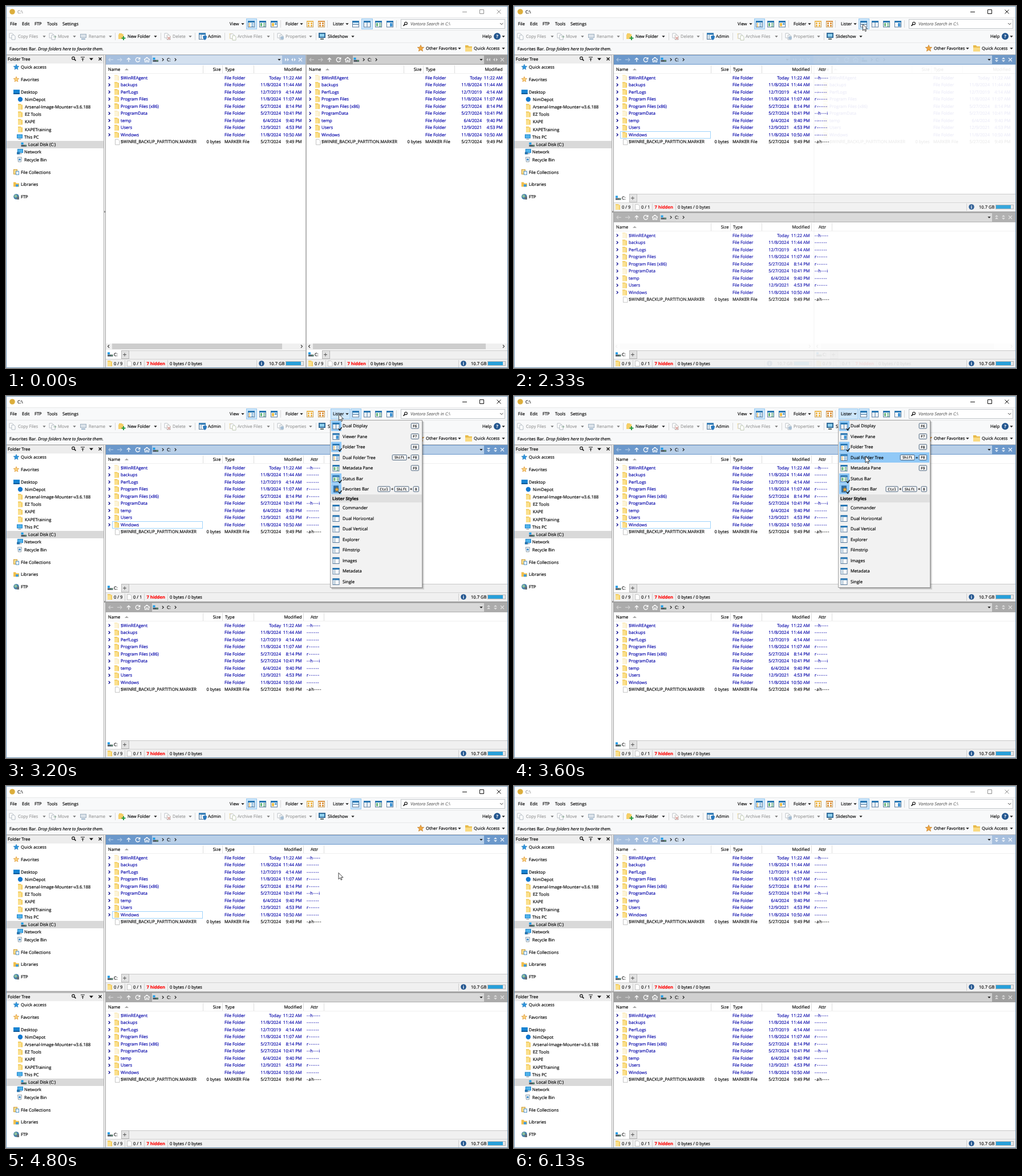
Recreate the animation shown at these times as an HTML page. Size 880 by 636 pixels, loop 6.27 s.

```html
<!DOCTYPE html>
<html lang="en">
<head>
<meta charset="utf-8">
<title>File manager layouts</title>
<style>
html, body { margin: 0; width: 100%; height: 100%; overflow: hidden; background: #fff; }
svg {
  display: block; width: 880px; height: 636px;
  font: 7.55px "Open Sans", "Noto Sans", sans-serif;
  text-rendering: geometricPrecision;
  --ink: #000;
  --cap: #909090; --nav: #a6bfde; --nav2: #a0a0a0; --field: #d3e0ef; --field2: #d0d0d0; --focus: none;
}
svg.active { --cap: #111; --nav: #6b98cb; --nav2: #ababab; --field: #b8cfe8; --field2: #d8d8d8; --focus: #9fd4fb; }
text { fill: var(--ink); stroke: var(--ink); stroke-width: .16px; }
.cap { --ink: var(--cap); }
.capline { stroke: var(--cap); fill: none; }
.b { font-weight: 700; }
.i { font-style: italic; }
.e { text-anchor: end; }
.m { text-anchor: middle; }
.off { --ink: #9c9c9c; }
.hint { --ink: #6c6c6c; }
.white { --ink: #fff; }
.blue { --ink: #0000a8; }
.red { --ink: #f00; font-weight: 700; }
.attr { letter-spacing: .75px; }
.key { font: 6px "Noto Sans Mono", "DejaVu Sans Mono", monospace; text-anchor: middle; }
</style>
</head>
<body>
<svg id="stage" viewBox="0 0 880 636" xmlns="http://www.w3.org/2000/svg"></svg>
<script>
const LOOP = 6270, STEP = 200 / 3;
const stage = document.getElementById('stage');

// Basic shapes
const rect = (x, y, w, h, fill, line) => line
  ? `<rect x="${x + .5}" y="${y + .5}" width="${w - 1}" height="${h - 1}" fill="${fill}" stroke="${line}"/>`
  : `<rect x="${x}" y="${y}" width="${w}" height="${h}" fill="${fill}"/>`;
const path = (d, line, w = 1, fill = 'none') =>
  `<path d="${d}" stroke="${line}" stroke-width="${w}" fill="${fill}"/>`;
const shape = (d, fill) => `<path d="${d}" fill="${fill}"/>`;
const dot = (x, y, r, fill) => `<circle cx="${x}" cy="${y}" r="${r}" fill="${fill}"/>`;
const text = (x, y, s, cls = '') => `<text x="${x}" y="${y + 2.7}" class="${cls}">${s}</text>`;
const group = (id, body) => `<g id="${id}">${body}</g>`;
const tri = (x, y, fill = '#222') => shape(`M${x - 2.7} ${y - 1.3}h5.4l-2.7 3z`, fill);
const chev = (x, y, c = '#111', w = 1.1) => path(`M${x - 1.2} ${y - 2.4}l2.4 2.4l-2.4 2.4`, c, w);
const vline = (x, y, h, c = '#d6d6d6') => rect(x, y, 1, h, c);

// Icons, placed by their centre
const folder = (x, y, pale) =>
  shape(`M${x - 4} ${y - 5}h5l1 1.5h2v8.5h-8z`, pale ? '#faecc0' : '#f3cd62') +
  shape(`M${x - 4} ${y - 3}h6v8h-6z`, pale ? '#fdf4d8' : '#fbe08d');
const file = (x, y) => path(`M${x - 3.5} ${y - 4.5}h5l2.5 2.5v7h-7.5z`, '#b4b4b4', .8, '#fff');
const star = (x, y, r, fill, line) => {
  const pts = Array.from({ length: 10 }, (_, k) => {
    const a = k * Math.PI / 5, q = k % 2 ? r * .45 : r;
    return (x + q * Math.sin(a)).toFixed(1) + ' ' + (y - q * Math.cos(a)).toFixed(1);
  });
  return path(`M${pts.join('L')}Z`, line, .7, fill);
};
const screen = (x, y) => rect(x - 5, y - 4.5, 10, 7, '#1d83cc') + rect(x - 4, y - 3.5, 8, 5, '#50b4ec') +
  rect(x - 2.5, y + 3.5, 5, 1, '#6f7d88');
const disk = (x, y) => rect(x - 4.5, y + .5, 9.5, 3.2, '#4f5a64') + rect(x + 2, y + 1.5, 2, 1, '#5fe06c') +
  rect(x - 4.5, y - 3.6, 4, 3.6, '#1c9be6');
const info = (x, y, r, c) => dot(x, y, r, '#23568f') + text(x, y, c, 'm b white');
// dir 1: handle to the right, -1: to the left
const lens = (x, y, dir) =>
  `<circle cx="${x - dir}" cy="${y - 1}" r="2.3" fill="none" stroke="#111" stroke-width="1.1"/>` +
  path(`M${x + .6 * dir} ${y + .6}l${2.8 * dir} 2.8`, '#111', 1.6);
const sheet = (x, y, c) => path(`M${x - 5} ${y - 5}h5l2 2v6h-7z`, '#aeb4ba', .8, '#fff') +
  path(`M${x - 1} ${y - 2}h4l2 2v6h-6z`, c, .9, '#fff');

// Small window glyph with a chosen inner layout
const inner = {
  rows: (x, y) => rect(x - 5, y + .5, 10, 1, '#2f6a9d') + rect(x - 5, y - 2, 10, 1.5, '#a9d4f2'),
  cols: (x, y) => rect(x - .5, y - 3, 1, 8, '#2f6a9d'),
  list: (x, y) => [0, 2.5, 5].map(d => rect(x - 4, y - 1.5 + d, 2, 1.4, '#eba833') + rect(x, y - 1.5 + d, 4, 1.2, '#4b91c7')).join(''),
  green: (x, y) => rect(x - 4, y - 1.5, 3, 5.5, '#69b87c') + [0, 2.5, 5].map(d => rect(x + 1, y - 1.5 + d, 3.5, 1.2, '#3f9a62')).join(''),
  gold: (x, y) => rect(x - 4, y - 1.5, 4, 5.5, '#f1bd48') + rect(x + 1, y - 1.5, 3.5, 3, '#5ba4d7'),
  pane: (x, y) => rect(x, y - 1.5, 4.5, 6, '#3f93d3'),
  style: (x, y) => rect(x - 5, y - 2.5, 3, 7.5, '#d5e4ef') + rect(x - 2, y - 2.5, .8, 7.5, '#8096a8')
};
const win = (x, y, kind) => rect(x - 6, y - 5.5, 12, 11.5, '#fff', '#58799a') +
  rect(x - 6, y - 5.5, 12, 3, '#2978b5') + inner[kind](x, y);
const grid = (x, y, c) => rect(x - 6, y - 5.5, 12, 11.5, '#fff', '#c39a55') + rect(x - 6, y - 5.5, 12, 2, c) +
  [[-4, -2.5], [1, -2.5], [-4, 1.5], [1, 1.5]].map(([a, b]) => rect(x + a, y + b, 3, 3, c)).join('');
const hot = (x, w, y = 22, h = 19) => rect(x, y, w, h, '#cde6fa', '#97c9f1');

function toolbars() {
  const menus = [[7, 'File'], [28, 'Edit'], [50, 'FTP'], [72, 'Tools'], [99, 'Settings'], [392, 'View'], [490, 'Folder'], [573, 'Lister']];
  const tools = [[21, 'Copy Files', 67, 1], [91, 'Move', 120, 1], [145, 'Rename', 183, 1], [213, 'New Folder', 262], [292, 'Delete', 323, 1],
    [354, 'Admin'], [406, 'Archive Files', 460, 1], [490, 'Properties', 534, 1], [564, 'Slideshow', 608]];
  return rect(0, 0, 880, 21, '#fff') + rect(0, 21, 880, 65, '#f8f9fa') +
    [20, 42, 64].map(y => rect(0, y, 880, 1, '#e6e7e8')).join('') +
    dot(11, 10, 4.8, '#dcae3c') + text(20, 10.5, 'C:\\', 'cap') +
    '<path class="capline" d="M800 10.5h8M830.5 6.5h7v7h-7zM860.5 6.5l7 7m0-7l-7 7"/>' +
    hot(421, 19) + group('hotRows', hot(604, 19)) + group('hotCols', hot(623, 20)) + group('hotLister', hot(569, 34)) +
    menus.map(m => text(m[0], 31.5, m[1])).join('') + [415, 518, 598].map(x => tri(x, 31.5)).join('') +
    win(430, 31.5, 'list') + win(450, 31.5, 'green') + win(470, 31.5, 'gold') +
    grid(533, 31.5, '#eeb84b') + grid(553, 31.5, '#dc9440') +
    win(613, 31.5, 'rows') + win(633, 31.5, 'cols') + win(653, 31.5, 'green') + win(673, 31.5, 'pane') +
    [481, 563, 684].map(x => vline(x, 25, 13)).join('') +
    rect(692, 23, 183, 17, '#fff', '#c2c6ca') + lens(700, 31.5, -1) +
    text(709, 31.5, 'Vantora Search in C:\\', 'i hint') + path('M866 30l2.7 2.7l2.7-2.7', '#444') +
    tools.map(([x, s, a, off]) => text(x, 53.5, s, off ? 'off' : '') + (a ? tri(a, 53.5, off ? '#777' : '#222') : '')).join('') +
    [191, 271, 331, 383, 469, 543].map(x => vline(x, 47, 13)).join('') +
    sheet(11, 53, '#aab4bd') + sheet(81, 53, '#aab4bd') + path('M83 54h5m-2-2l2 2l-2 2', '#8cab94') +
    rect(130, 49, 11, 7, '#dce3ea', '#9eb0c0') + rect(132, 57, 7, 2, '#9cb5cc') +
    folder(202, 53) + rect(197, 50, 7, 8, '#f6cf68') + path('M206 53v7m-3.5-3.5h7', '#2b9b4a', 2) +
    sheet(283, 53, '#b7b7b7') + path('M283 54l5 5m0-5l-5 5', '#d79a94', 1.3) +
    win(344, 53, 'style') + shape('M345 53l4-1.5l3 1.5q0 5-3.5 7q-3.5-2-3.5-7z', '#2878bd') +
    folder(395, 53, 1) + sheet(398, 54, '#b7c3aa') + sheet(481, 53, '#aab4bd') + dot(484, 56, 3, '#a7bfd4') +
    rect(548, 47, 12, 9, '#306b99') + rect(550, 49, 8, 5, '#8ed0ee') + rect(551, 57, 6, 2, '#566') +
    text(835, 53.5, 'Help') + info(861, 53.3, 6, '?') + tri(872, 53.5) +
    `<text x="6" y="77.7">Favorites Bar. <tspan class="i">Drop folders here to favorite them.</tspan></text>` +
    star(727, 74.5, 6, '#f0a742', '#c17a25') + text(736, 74.5, 'Other Favorites') + tri(795, 74.5) +
    shape('M805 69h5l1.5 2h5.5v9h-12z', '#e9bb4c') + rect(805, 73, 12, 7, '#fadb83') + text(820, 74.5, 'Quick Access') + tri(872, 74.5);
}

const places = [
  [107.5, 26, 'Quick access', (x, y) => star(x, y, 5, '#2d96df', '#1b75b8')],
  [129, 26, 'Favorites', (x, y) => star(x, y, 5, '#fbd07a', '#d9912d')],
  [151, 26, 'Desktop', (x, y) => rect(x - 5, y - 4, 11, 8, '#1683d2') + rect(x - 5, y + 2, 11, 2, '#0d5a98')],
  [164, 33, 'NimDepot', (x, y) => dot(x, y, 4.2, '#1478cf')],
  [177, 33, 'Arsenal-Image-Mounter-v3.6.188', folder],
  [190.3, 33, 'EZ Tools', folder],
  [203.5, 33, 'KAPE', folder],
  [216.8, 33, 'KAPETraining', folder],
  [230, 32, 'This PC', screen],
  [243.4, 39, 'Local Disk (C:)', disk],
  [256.6, 32, 'Network', (x, y) => screen(x + 1, y - 1) + rect(x - 5, y, 5, 4, '#2673ad')],
  [269.8, 32, 'Recycle Bin', (x, y) => path(`M${x - 3.5} ${y - 4}h7l-1 8h-5z`, '#8393a0', .9, '#eef4f8') + dot(x, y, 1.8, '#3a8acb')],
  [291.8, 26, 'File Collections', (x, y) => rect(x - 5, y - 5, 7, 9, '#f8dc8c', '#c99b3a') + rect(x - 1, y - 2, 6, 7, '#fff', '#4c8fc4')],
  [313.4, 26, 'Libraries', (x, y) => shape(`M${x - 5} ${y - 4}h4l1 2h5v6h-10z`, '#f2c04c') + rect(x - 1, y, 5, 4, '#3f9be0')],
  [335, 26, 'FTP', (x, y) => dot(x, y, 4.8, '#457fa9') + dot(x - 1, y - 1, 2.5, '#8fc29b') + rect(x + 1, y, 4, 5, '#666f78')]
];

function tree(dy, bottom) {
  const y = 86 + dy;
  return rect(0, y, 175, bottom - y, '#f0f0f0') + rect(1, y, 171, 15, '#ededed') + text(3, y + 7, 'Folder Tree') +
    lens(119, y + 6.7, 1) + path(`M131 ${y + 4}h7M134.5 ${y + 11}v-5m-2 2l2-2l2 2`, '#111') +
    shape(`M146 ${y + 5.5}h7l-3.5 4z`, '#111') + path(`M162.5 ${y + 4.5}l5 5m0-5l-5 5`, '#111', 1.3) +
    rect(1, y + 15, 170, bottom - y - 15, '#fff') + rect(1, 237 + dy, 170, 13, '#d9d9d9') + vline(171, y, bottom - y, '#b0b0b0') +
    rect(1, y, 171, 1, '#c4c4c4') +
    places.map(([py, x, s, icon]) => icon(x - 8, py + dy) + text(x, py + dy, s)).join('');
}

const rows = `$WinREAgent,Today,11:22 AM,--h----
backups,11/8/2024,11:44 AM,-------
PerfLogs,12/7/2019,4:14 AM,-------
Program Files,11/8/2024,11:07 AM,r------
Program Files (x86),5/27/2024,8:14 PM,r------
ProgramData,5/27/2024,10:41 PM,--h---i
temp,6/4/2024,9:40 PM,-------
Users,12/9/2021,4:53 PM,r------
Windows,11/8/2024,10:50 AM,-------
$WINRE_BACKUP_PARTITION.MARKER,5/27/2024,9:49 PM,-ah----`.split('\n').map(r => r.split(','));

function listing(x, y, focus) {
  return rows.map(([name, day, time, attr], n) => {
    const cy = y + 40 + n * 12.53, last = n === 9, c = last ? '' : 'blue';
    const mark = focus && n === 8 ? rect(x + 11, Math.round(cy) - 6, 159, 13, 'none', 'var(--focus)') : '';
    return mark + (last ? file(x + 20, cy) + text(x + 201.5, cy, '0 bytes', 'e')
      : chev(x + 6, cy, '#00008c', 1.3) + folder(x + 19, cy, n === 0 || n === 5)) +
      text(x + 26, cy, name, c) + text(x + 208, cy, last ? 'MARKER File' : 'File Folder', c) +
      text(x + 307, cy, day, c + ' e') + text(x + 343.7, cy, time, c + ' e') + text(x + 352, cy, attr, c + ' attr');
  }).join('');
}

let clips = 0;
function pane(x, y, right, bottom, second, thumb) {
  const id = 'clip' + clips++, w = right - x, ny = y + 8.3, k = second ? 2 : '', white = '#fff';
  const dim = 'rgba(255,255,255,.45)', ty = bottom - 31, sy = bottom - 8;
  const seps = [170, 204, 259].concat(thumb ? [] : [346, 382]);
  let s = rect(x, y, w, bottom - y, '#fff') + rect(x, y, w, 17, `var(--nav${k})`) +
    rect(x + 81, y + 1, w - 122, 15, `var(--field${k})`) +
    path(`M${x + 13} ${ny}h-8m3-3l-3 3l3 3M${x + 20} ${ny}h8m-3-3l3 3l-3 3`, dim, 1.2) +
    path(`M${x + 40} ${ny + 4}v-7m-3 3l3-3l3 3M${x + 59} ${ny - 2}a3.7 3.7 0 1 0 .5 3.2m.3-5.2v3h-3`, white, 1.3) +
    path(`M${x + 67} ${ny}l5-4l5 4m-8.5-1v5h2.5v-3h2v3h2.5v-5`, white, 1.1) +
    disk(x + 87, ny) + chev(x + 100, ny) + text(x + 107, ny, 'C:') + chev(x + 122, ny) + tri(right - 46, ny);
  const bx = right - 33, f = second ? -1 : 1, light = second ? 'rgba(255,255,255,.6)' : 'rgba(255,255,255,.85)';
  s += shape(thumb
    ? `M${bx - 3 * f} ${ny - 3}l${3 * f} 3l${-3 * f} 3zM${bx + f} ${ny - 3}l${3 * f} 3l${-3 * f} 3z` +
      `M${bx + 11} ${ny - 3}v6l-3-3zM${bx + 13} ${ny - 3}v6l3-3z`
    : `M${bx - 3} ${ny - 3 * f}h6l-3 ${3 * f}zM${bx - 3} ${ny + f}h6l-3 ${3 * f}z` +
      `M${bx + 9} ${ny - 1}h6l-3-3zM${bx + 9} ${ny + 1}h6l-3 3z`, light);
  s += path(`M${bx + 21} ${ny - 3}l6 6m0-6l-6 6`, light, 1.3) +
    rect(x, y + 32, w, 1, '#efefef') + seps.map(d => vline(x + d, y + 18, 14, '#dedede')).join('') +
    text(x + 4, y + 25.5, 'Name') + shape(`M${x + 33} ${y + 27}l3.5-3.5l3.5 3.5z`, '#a8a8a8') +
    text(x + 201.5, y + 25.5, 'Size', 'e') + text(x + 209, y + 25.5, 'Type') +
    text(x + 343.7, y + 25.5, 'Modified', 'e') + text(x + 359, y + 25.5, 'Attr') + listing(x, y, !second);
  if (thumb) {
    const by = bottom - 38;
    s += rect(x, by - 5, w, 11, '#f0f0f0') + rect(x + 11, by - 5, thumb - x - 11, 10, '#cdcdcd') +
      path(`M${x + 6} ${by - 2.5}l-2.5 2.5l2.5 2.5M${right - 8} ${by - 2.5}l2.5 2.5l-2.5 2.5`, '#444', 1.2);
  }
  s += rect(x, ty, w, 31, '#f0f0f0') + rect(x, ty, w, 1, '#c8c8c8') + rect(x, ty, 27, 16, '#fff') + vline(x + 27, ty, 16, '#a8a8a8') +
    rect(x + 27, ty, 14, 15, '#e2e2e2', '#b8b8b8') + disk(x + 7.5, bottom - 24) + text(x + 14, bottom - 24, 'C:') +
    path(`M${x + 30} ${bottom - 23.5}h6m-3-3v6`, '#555') +
    rect(x, bottom - 16, w, 1, '#d2d2d2') + folder(x + 7, sy) + text(x + 14, sy, '0 / 9') + file(x + 41, sy) + text(x + 48, sy, '0 / 1') +
    text(x + 71.5, sy, '7 hidden', 'red') + text(x + 112, sy, '0 bytes / 0 bytes') +
    [33, 67, 108, w - 86].map(d => vline(x + d, bottom - 14, 13, '#cfcfcf')).join('') +
    info(right - 77, sy, 4.8, 'i') + text(right - 64, sy, '10.7 GB') +
    rect(right - 35, sy - 4, 32, 8, '#e8e8e8', '#b4b4b4') + rect(right - 34, sy - 3, 26, 6, '#28a0da');
  return `<clipPath id="${id}"><rect x="${x}" y="${y}" width="${w}" height="${bottom - y}"/></clipPath><g clip-path="url(#${id})">${s}</g>`;
}

const options = [['Dual Display', 'cols', 1, 'F6'], ['Viewer Pane', 'pane', 0, 'F7'], ['Folder Tree', 'list', 1, 'F8'],
  ['Dual Folder Tree', 'list', 0, 'Shift', 'F8'], ['Metadata Pane', 'green', 0, 'F9'], ['Status Bar', 'green', 1],
  ['Favorites Bar', 'gold', 1, 'Ctrl', 'Shift', 'B']];
const styles = ['Commander', 'Dual Horizontal', 'Dual Vertical', 'Explorer', 'Filmstrip', 'Images', 'Metadata', 'Single'];

function keys(list, y) {
  let right = 724, s = '';
  [...list].reverse().forEach((k, n) => {
    if (n) { s += text(right - 3.5, y, '+', 'm'); right -= 7; }
    const w = k.length * 3.9 + 6.5;
    s += `<rect x="${right - w + .5}" y="${y - 4.5}" width="${w - 1}" height="9" rx="1.2" fill="#fafafa" stroke="#34506c" stroke-width=".9"/>` +
      `<text class="key" x="${right - w / 2}" y="${y + 2.2}">${k}</text>`;
    right -= w;
  });
  return s;
}
function menu() {
  return rect(571, 45, 162, 295, 'rgba(0,0,0,.13)') + rect(570, 44, 161, 294, 'rgba(0,0,0,.25)') +
    rect(568, 42, 162, 295, '#f2f2f2', '#a3a3a3') + group('hotItem', rect(570, -9, 158, 18, '#91c9f7')) +
    options.map(([s, kind, on, ...ks], n) => {
      const y = 52.5 + n * 18.5;
      return (on ? rect(570, y - 9, 18, 18, '#91c9f7') : '') + (s === 'Favorites Bar' ? rect(574, y - 6, 9, 12, '#2f6c9f') + star(580, y + 1, 4, '#f0ad42', '#b57a20') : win(578.5, y, kind)) +
        (on ? path(`M583 ${y + 5}l2 2.5l3.5-5`, '#111', 1.4) : '') + text(590, y, s) + keys(ks, y);
    }).join('') +
    rect(569, 173, 160, 14, '#e0e0e0') + text(572, 180, 'Lister Styles', 'b') +
    styles.map((s, n) => win(578.5, 196.5 + n * 18.5, 'style') + text(590, 196.5 + n * 18.5, s)).join('');
}

stage.innerHTML = toolbars() + tree(0, 636) + rect(172, 86, 708, 550, '#f0f0f0') +
  group('across', rect(172, 360, 708, 3, '#a0a0a0') + pane(175, 86, 879, 361) + pane(175, 363, 879, 636, true)) +
  group('beside', rect(523, 86, 5, 550, '#b4b4b4') + pane(175, 86, 525, 636, false, 484) + pane(527, 86, 879, 636, true, 841)) +
  group('tree2', tree(277, 636) + rect(0, 360, 175, 3, '#b4b4b4')) +
  vline(174, 86, 550, '#a0a0a0') + rect(0, 85, 880, 1, '#b8b8b8') + path('M.5 .5h879v635h-879z', '#6c93b4') +
  group('menu', menu()) +
  group('cursor', path('M0 0V11.2L2.6 8.8L4.3 12.6L6 11.9L4.4 8.2H8Z', '#111', .8, '#fff') +
    group('busy', '<circle cx="9.7" cy=".5" r="3.7" fill="#d9f0fc" stroke="#1b87d8" stroke-width="2.2"/>'));

const ui = {};
stage.querySelectorAll('g[id]').forEach(g => ui[g.id] = g);

// Pointer stops: time, x, y
const stops = [[1533, 615, 15], [1800, 611.5, 32], [2400, 611.5, 32], [2933, 583.5, 32], [3267, 583.5, 32],
  [3600, 616, 106], [3800, 592, 107], [4400, 592, 107], [4800, 583, 152.5], [5200, 583, 152.5], [5867, 30, 638]];
function pointer(t) {
  const n = stops.findIndex(s => s[0] > t);
  if (n < 1) return n < 0 ? stops[stops.length - 1].slice(1) : [-50, -50];
  const [a, b] = [stops[n - 1], stops[n]];
  const p = (1 - Math.cos(Math.PI * (t - a[0]) / (b[0] - a[0]))) / 2;
  return [a[1] + (b[1] - a[1]) * p, a[2] + (b[2] - a[2]) * p];
}
const show = (g, v) => g.style.opacity = +v;

function draw() {
  // The screen is sampled at 15 pictures a second
  const t = Math.floor((performance.now() % LOOP + 5) / STEP) * STEP + 1;
  const [x, y] = pointer(t), within = (a, b) => t >= a && t < b;
  const over = (a, b) => x >= a && x < b && y >= 22 && y < 41;
  stage.classList.toggle('active', within(2066, 5933));
  show(ui.beside, t < 2333 ? 1 : t < 2400 ? .07 : 0);
  show(ui.tree2, t >= 4466);
  show(ui.hotCols, t < 2333);
  show(ui.hotRows, t >= 2333 || over(604, 623));
  show(ui.hotLister, within(3000, 4466) || over(569, 603));
  show(ui.menu, within(3000, 4200) ? Math.min(1, .25 + (t - 3000) / 260) : 0);
  const item = Math.floor((y - 43.2) / 18.5);
  show(ui.hotItem, item >= 0 && item < 7);
  ui.hotItem.setAttribute('transform', `translate(0 ${52.5 + item * 18.5})`);
  show(ui.cursor, within(1533, 5933));
  show(ui.busy, within(4200, 4466));
  ui.cursor.setAttribute('transform', `translate(${x.toFixed(2)} ${y.toFixed(2)})`);
  requestAnimationFrame(draw);
}
draw();
</script>
</body>
</html>
```
